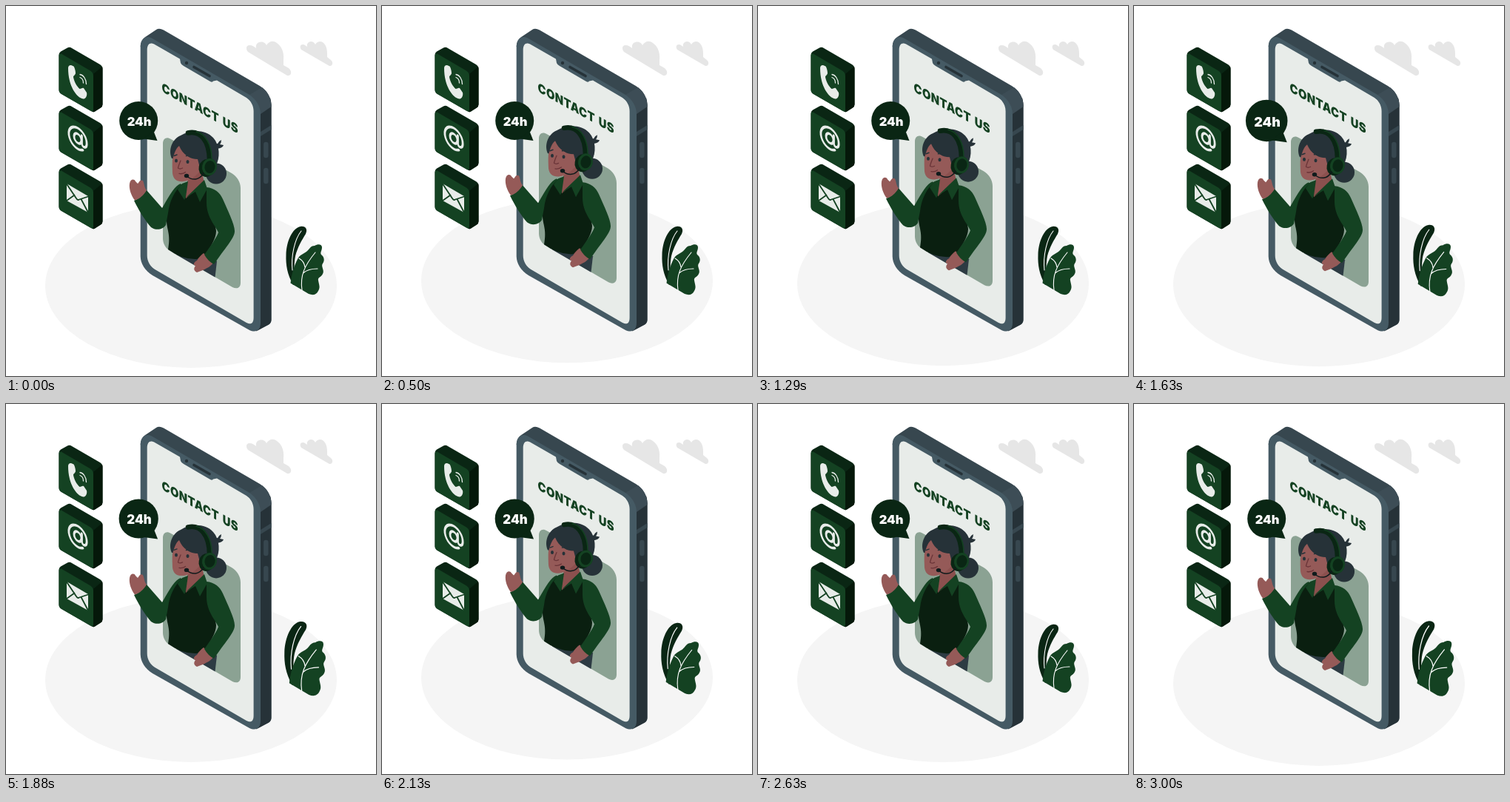
Recreate the animation shown at these times as an HTML page. Size 500 px wide and 500 px high, loop 3.04 s.

```html
<!DOCTYPE html>
<html lang="en">
<head>
<meta charset="utf-8">
<title>Contact us</title>
<style>
html, body { margin: 0; width: 100%; height: 100%; overflow: hidden; background: #fff; }
svg { display: block; width: 100vw; height: 100vh; }
text { font-family: Inter, Lato, "Open Sans", sans-serif; font-weight: 900; }
.g { fill: #144222; }
.d { fill: #0a2614; }
.ink { fill: #263238; }
.skin { fill: #955a58; }
.line { fill: none; stroke-linecap: round; stroke-linejoin: round; }
</style>
</head>
<body>
<svg viewBox="0 0 500 500">
  <defs>
    <g id="tile">
      <path class="d" d="M71.500 66Q71.500 63 74 61.500L83 56.500Q86 55 89 57L127 79Q130.500 81 130.500 85V133Q130.500 136 128 137.500L120 142.800Q118 144 115 142L75 119Q71.500 117 71.500 113Z"/>
      <path fill="#05180a" d="M118 92L130 82Q130.500 83 130.500 85V133Q130.500 136 128 137.500L118 143.500Z"/>
      <path class="g" d="M71.500 67Q71.500 63 75.500 65L114 87.500Q118 90 118 94.500V139Q118 144 114 141.500L75.500 119.300Q71.500 117 71.500 113Z"/>
    </g>
  </defs>

  <ellipse class="float" cx="250" cy="378" rx="197" ry="111" fill="#f5f5f5"/>

  <g id="clouds" fill="#e6e6e6">
    <path d="M327 62C324 59 324 53 329 53C333 53 335 55 338 57C337 52 340 48.500 345 48.500C349 48.500 351 51 352 53C355 48 361 46 366 50C372 54 376 62 375 72V80L382 84C387 88 386 95 380 94Z"/>
    <path d="M399 59C397 56 397 52 401 52C404 52 405 54 407 55C406 51 409 48 412 48C415 48 417 50 418 52C420 48 425 47 428 49C433 53 434 58 434 65V69L439 73C443 76 441 82 437 81Z"/>
  </g>

  <use href="#tile"/>
  <use href="#tile" y="79"/>
  <use href="#tile" y="158"/>
  <g id="icons" fill="#e8ece9">
    <path d="M84 84C84 81 86 79.500 88 80L91.500 81.500C93 84 94 88 94 91C93.500 93.500 91 94 91 96C92 102 95.500 108.500 99.500 112C101.500 112 103 110 105 111L109 117C110 121 108 125 105 125.500C97 125 89 113 86 101C84.500 95 84 89 84 84Z"/>
    <path class="line" stroke="#e8ece9" stroke-width="1.300" d="M100 96.500C102.500 97.500 104.500 100.500 104.500 104M100 92.500C104.500 93 108.500 99 108.500 105.500"/>
    <g class="line" stroke="#e8ece9" stroke-width="3.300" transform="matrix(.866 .5 0 1 97 179)">
      <ellipse rx="5.800" ry="6.200"/>
      <path d="M6.300 -7V3C6.300 9 14 8 14 0A14 14 0 1 0 8 11.500"/>
    </g>
    <path d="M82 240L111 257V279L82 263Z"/>
    <path class="line" stroke="#144222" stroke-width="1.800" d="M82 240.500L95 260Q97 263 99 261.500L111 257.500M82 263L92.500 255.500M111 279L101.500 261"/>
  </g>

  <g id="phone">
    <path fill="#37474f" d="M181.700 55Q182 46 188 42L203 32Q207 29.500 213 32.500L343 108C353 114 358.500 124 358.500 134V424Q358.500 428 355 430.500L340 438.500L300 400L190 60Z"/>
    <path class="ink" d="M340 132L357 124Q358.500 129 358.500 134V424Q358.500 428 355 430.500L338 439.500Z"/>
    <path fill="#3d4d56" d="M329 120L346 110C354 116 358.500 125 358.500 136L344 146Z"/>
    <path fill="#37474f" d="M344 170L358.500 161V167L344 176Z"/>
    <path class="line" stroke="#37474f" stroke-width="6.500" d="M351.300 187V202M351.300 222V237"/>
    <path fill="#455a64" d="M181.700 55C181.700 44 189 39 198 44L329 120C338 126 344 136 344 146V428C344 438 338 442 329 438L198 364C188 358 181.700 348 181.700 338Z"/>
    <path fill="#e8ece9" d="M190.700 60C190.700 51 195 48.500 201 52L235 71.600L236 77Q237 79.500 240 81L276 102Q279 103.500 280 101.500L285 100.500L325 124C331 128 334.600 135 334.600 142V421C334.600 429 331 431 325 428L203 357C195 353 190.700 345 190.700 337Z"/>
    <circle class="ink" cx="244" cy="77" r="2.200"/>
    <path class="line" stroke="#263238" stroke-width="3.600" d="M254 82.500L275 94.500"/>
  </g>
  <text class="g" font-size="17" letter-spacing=".5" word-spacing="1.500" transform="matrix(.866 .48 0 1 210.500 115.600)">CONTACT US</text>

  <g class="float">
    <path fill="#8ba293" d="M212 186C212 179 217 176 223 180L305 226C312 230 317 238 317 246V374C317 381 312 383 306 380L222 331C216 328 212 321 212 314Z"/>
    <!-- body -->
    <path fill="#2d3b43" d="M230 328L272 330L285 345L282.500 366.500L230 336Z"/>
    <path fill="#0a1f10" d="M236 241C226 248 217 272 217 290C217 302 223 308 219 329Q238 343 258 342L270 336C276 325 284 315 284 304L277 260L268 240Z"/>
    <path class="g" d="M236 240C228 243 222 254 211 273L190 249Q183 259 173 263C180 277 188 290 196 299C203 304 212 302 216 296L219 280C221 262 229 249 237 242Z"/>
    <path class="skin" d="M174 262.500C169 256 166 247 167 240C168 234 173 233 175 237L178 240C180 238 181 234 185 236C187 240 186.500 245 190 249C186 256 180 261 174 262.500Z"/>
    <path class="skin" d="M267 334L281 346C277 352 272 354 266 357L258 360C254 358 253 355 256 351C252 350 254 346 258 344C261 339 264 336 267 334Z"/>
    <path class="g" d="M271 245C282 246 289 252 293 261C300 277 309 295 309 304C309 313 300 322 281 349Q273 345 268 336C276 325 284 314 287 306C283 297 271 285 271 266Z"/>
    <path fill="#8b504e" d="M246 234L264 221L268 239L243 260L241 250Z"/>
    <path class="g" d="M246 237L238 240L232 248L241 262L243 258Z"/>
    <path class="g" d="M268 235L272 247L262 265L256 251L243 259Z"/>
    <!-- head -->
    <circle class="ink" cx="284" cy="226.500" r="14"/>
    <path class="ink" d="M281 187L286 186Q288 182 291 181Q291 185 289 187L294 188Q293 192 285 193Z"/>
    <path class="skin" d="M233 185C225 193 224 205 225 226C226 235 232 238 240 237C248 236 257 230 263 222L268 200L250 185Z"/>
    <path class="ink" d="M224 206C219 195 224 180 236 175C250 166 270 167 280 178C289 188 290 205 283 217C278 224 270 228 264 226L259 207C249 207 239 201 234 189C230 192 227.500 198 225.500 206Z"/>
    <g class="ink">
      <ellipse cx="230" cy="209" rx="2" ry="2.500"/>
      <ellipse cx="245.500" cy="210.500" rx="2" ry="2.500"/>
    </g>
    <path class="line" stroke="#263238" stroke-width="1.500" d="M227 202.500L231 201M243.500 202.500Q247 201.500 250 204.500"/>
    <path class="line" stroke="#6a3438" stroke-width="1.300" d="M236 209Q233 216 232.500 219Q235 221 238.500 219M234 226.500Q239 227.500 242.500 224.500"/>
    <!-- headset -->
    <path class="line" stroke="#0a2614" stroke-width="6.500" stroke-linecap="butt" d="M246 171.500C262 168 275 181 275 209"/>
    <path class="line" stroke="#144222" stroke-width="1.500" d="M257 170C270 173 278 188 278 206"/>
    <ellipse class="d" cx="271" cy="219" rx="10.500" ry="12" transform="rotate(12 271 219)"/>
    <ellipse class="g" cx="275" cy="217.500" rx="10" ry="11.500" transform="rotate(12 275 217.500)"/>
    <ellipse class="d" cx="275.500" cy="217.500" rx="7" ry="8.500" transform="rotate(12 275.500 217.500)"/>
    <path class="line" stroke="#101b1c" stroke-width="1.500" d="M267 226C261 236 252 236 244 230"/>
    <ellipse fill="#101b1c" cx="244" cy="229.500" rx="3.200" ry="2.700"/>
  </g>

  <g id="bubble">
    <circle class="d" cx="179.200" cy="155" r="26"/>
    <path class="d" d="M186 179.500L204.500 182L199 168Z"/>
    <text x="180" y="162" font-size="16.500" text-anchor="middle" fill="#fff">24h</text>
  </g>

  <g id="plant">
    <path class="d" d="M388 377C380 362 378 350 378.500 336C379 318 387 300 398 298C405 297 408 302 405 308C400 316 394 326 391 338C389 348 389 362 391 377Z"/>
    <path class="g" d="M384.500 374.500C386 362 389 352 394 342C397 336 402 335 406 332C410 329 411 324 417 324C422 321 427 322 427 326C427 331 424 333 426 336C430 339 431 344 428 348C425 352 431 357 428 362C426 367 421 366 422 371C423 377 425 380 422 385C419 391 414 391 409 389Z"/>
    <path class="line" stroke="#fff" stroke-width="1.100" d="M387 357C385 338 390 315 399 304M400 384C397 364 404 350 418 333M396 341Q403 345 404 353M401.500 361Q408 355 421 355"/>
  </g>
</svg>
<script>
const LOOP = 3040, END = 3000;
const floaters = document.querySelectorAll('.float');
const bubble = document.getElementById('bubble');
const plant = document.getElementById('plant');

// linear steps between [position, scale] stops
const beats = [[0, 1], [.1, 1.1], [.3, 1], [.4, 1], [.5, 1.1], [.6, 1], [1, 1]];
function beat(p) {
  const i = Math.max(1, beats.findIndex(b => b[0] >= p));
  const [a, x] = beats[i - 1], [b, y] = beats[i];
  return x + (y - x) * (p - a) / (b - a);
}

function zoom(el, cx, cy, s) {
  el.setAttribute('transform', `translate(${cx} ${cy}) scale(${s}) translate(${-cx} ${-cy})`);
}

function draw(t) {
  const p = t % 1500 / 1500;
  const lift = -10 * (1 - Math.abs(1 - 2 * p));
  floaters.forEach(el => el.setAttribute('transform', `translate(0 ${lift})`));
  zoom(bubble, 179, 155.5, beat(p));
  zoom(plant, 404, 344, t < 1500 ? 1 : beat((t - 1500) / 3000));
}

const start = performance.now();
function tick() {
  draw(Math.min((performance.now() - start) % LOOP, END));
  requestAnimationFrame(tick);
}
draw(0);
requestAnimationFrame(tick);
</script>
</body>
</html>
```
